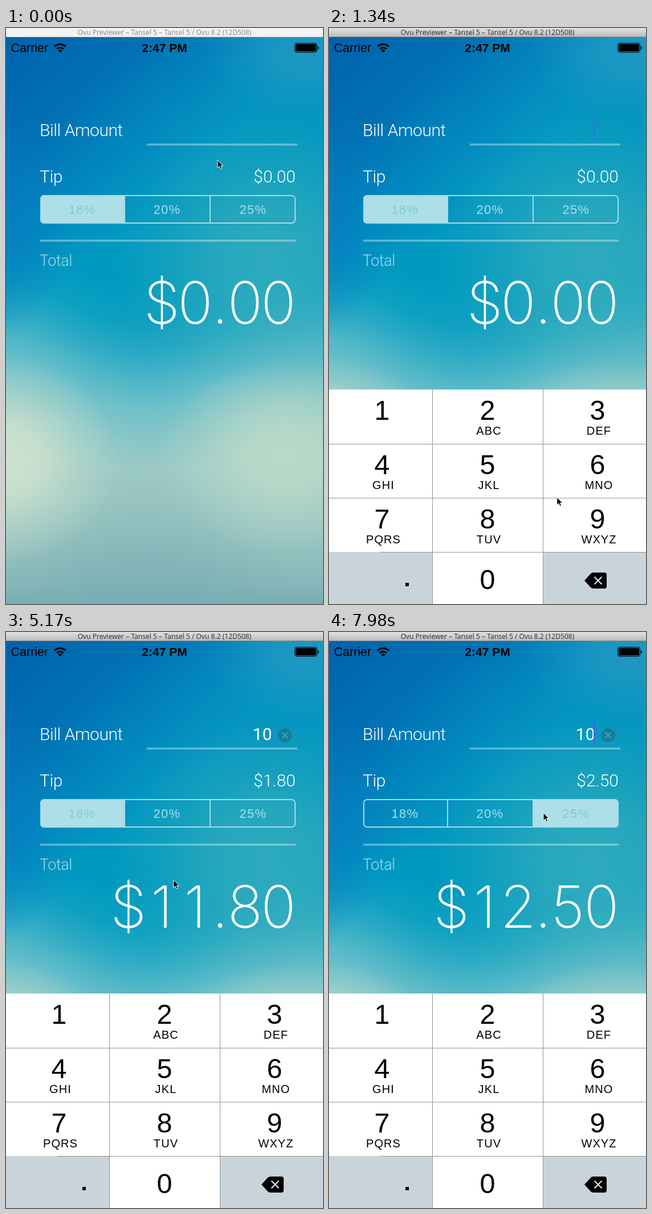
Recreate the animation shown at these times as an HTML page with a canvas. Size 556 by 1007 pixels, loop 8000 ms.

```html
<!DOCTYPE html>
<html lang="en">
<head>
<meta charset="utf-8">
<title>Tip calculator</title>
<style>
html, body { margin: 0; width: 100%; height: 100%; overflow: hidden; }
canvas, svg { position: absolute; left: 0; top: 0; width: 100vw; height: 100vh; }
text { fill: #fff; }
.bar text { font: 12.1px "Open Sans", sans-serif; text-anchor: middle; }
.status text { font: 21.5px "Liberation Sans", sans-serif; fill: #000; }
.status .clock { font-size: 21px; font-weight: 700; text-anchor: middle; }
.label { font: 300 30px Roboto, sans-serif; }
.name { letter-spacing: -.45px; }
.end { text-anchor: end; }
.total { font: 200 102px Inter, sans-serif; text-anchor: middle; }
.seg text { font: 22px "Liberation Sans", sans-serif; letter-spacing: 1.3px; text-anchor: middle; }
.pad text { fill: #000; text-anchor: middle; }
.num { font: 48.5px "Liberation Sans", sans-serif; }
.abc { font: 20px "Liberation Sans", sans-serif; letter-spacing: 1.1px; }
</style>
</head>
<body>
<canvas id="sky" width="556" height="1007"></canvas>
<svg viewBox="0 0 556 1007" preserveAspectRatio="none">
  <defs>
    <linearGradient id="active" x2="0" y2="1">
      <stop stop-color="#e2e2e2"/><stop offset="1" stop-color="#b9b9b9"/>
    </linearGradient>
    <clipPath id="round"><rect x="60" y="292" width="448" height="50" rx="7"/></clipPath>
  </defs>

  <g class="bar">
    <rect id="bar" width="556" height="16"/>
    <rect id="edge" y="15" width="556" height="1"/>
    <text id="title" x="278" y="11.5">Ovu Previewer – Tansel 5 – Tansel 5 / Ovu 8.2 (12D508)</text>
  </g>

  <g class="status">
    <text x="8.5" y="42">Carrier</text>
    <text class="clock" x="278" y="42">2:47 PM</text>
    <path d="M85 32.5a14.2 14.2 0 0 1 20 0M89 36.8a8.6 8.6 0 0 1 12 0" fill="none" stroke="#000" stroke-width="3"/>
    <path d="M91.4 39.3a5.2 5.2 0 0 1 7.2 0L95 43z"/>
    <rect x="506.5" y="26.5" width="39" height="16" rx="3" fill="none" stroke="#000"/>
    <rect x="508" y="28" width="36" height="13" rx="2"/>
    <path d="M547 32c2.5.5 2.5 5 0 5.5z"/>
  </g>

  <text class="label name" x="59" y="189">Bill Amount</text>
  <text class="label name" x="59" y="270">Tip</text>
  <text class="label name" x="59" y="416" style="font-size:27px" fill-opacity=".65">Total</text>
  <rect x="247" y="202" width="264" height="3.5" fill="#fff" opacity=".35"/>
  <rect x="60" y="370" width="448" height="3.5" fill="#fff" opacity=".35"/>
  <text class="label end" id="bill" x="466.5" y="188.5" style="font-weight:400"></text>
  <g id="clear">
    <circle cx="489.5" cy="180.5" r="12.5" fill="#147f9a"/>
    <path d="M484.5 175.5l10 10m0-10l-10 10" stroke="#3fa3bb" stroke-width="2"/>
  </g>
  <rect id="caret" x="464" y="158" width="3" height="38" fill="#4263f2"/>
  <text class="label end" id="tip" x="508" y="270"></text>
  <text class="total" id="total" y="517"></text>

  <g class="seg" id="seg">
    <rect id="fill" y="292" height="50" fill="#addfe9" clip-path="url(#round)"/>
    <rect x="61" y="293" width="446" height="48" rx="6" fill="none" stroke="#a6dce8" stroke-width="2"/>
    <path d="M208 292v50M358 292v50" stroke="#a6dce8" stroke-width="2"/>
  </g>

  <g class="pad" id="pad"></g>

  <path id="mouse" d="M0 0V13.5L3.2 10.7L5.3 15.5L7.7 14.5L5.6 9.8H9.8Z" fill="#000" stroke="#fff"/>
</svg>

<script>
const LOOP = 8000;
const $ = id => document.getElementById(id);
const add = (parent, tag, attrs, text = "") => {
  const el = document.createElementNS("http://www.w3.org/2000/svg", tag);
  for (const k in attrs) el.setAttribute(k, attrs[k]);
  el.textContent = text;
  return parent.appendChild(el);
};

// Vertical wash: y, colour, how far it sags in the middle
const wash = [[0, "#0894c0", 0], [420, "#009ac0", 30], [480, "#0ea0c2", 40], [530, "#2baac4", 42],
  [580, "#50b7c7", 42], [630, "#72c1c9", 40], [690, "#8ac7c8", 35], [760, "#9dcac6", 10],
  [830, "#9ac6c2", -25], [890, "#92c0be", -30], [950, "#86b6b9", -25], [1007, "#78adb5", 0]];

function paintSky() {
  const W = 556, H = 1007, g = $("sky").getContext("2d");
  for (let x = 0; x < W; x++) {
    const sag = Math.cos((x - 245) / W * 2 * Math.PI);
    const col = g.createLinearGradient(0, 0, 0, H);
    wash.forEach(([y, c, k]) => col.addColorStop((y + k * sag) / H, c));
    g.fillStyle = col;
    g.fillRect(x, 0, 1, H);
  }
  const glow = (x, y, rx, ry, rgb, alpha) => {
    g.save();
    g.translate(x, y);
    g.scale(rx, ry);
    const spot = g.createRadialGradient(0, 0, 0, 0, 0, 1);
    [1, 0.82, 0.35, 0].forEach((a, i) => spot.addColorStop(i / 3, `rgba(${rgb},${a * alpha})`));
    g.fillStyle = spot;
    g.fillRect(-1, -1, 2, 2);
    g.restore();
  };
  glow(460, 400, 270, 250, "51,172,188", 0.9);
  const corner = g.createLinearGradient(0, 0, 275, 306);
  corner.addColorStop(0, "rgba(0,96,172,1)");
  corner.addColorStop(0.45, "rgba(0,108,178,.85)");
  corner.addColorStop(0.72, "rgba(0,122,188,.55)");
  corner.addColorStop(1, "rgba(0,140,195,0)");
  g.fillStyle = corner;
  g.fillRect(0, 0, W, H);
  glow(0, 330, 110, 200, "10,125,195", 0.5);
  glow(530, 40, 180, 110, "32,152,194", 0.9);
  glow(-10, 755, 210, 180, "206,227,207", 1);
  glow(490, 750, 220, 170, "185,218,201", 1);
}
paintSky();

// Bursts of screen updates: start, end, count
const bursts = [[150, 450, 3], [740, 1780, 8], [1930, 2950, 8], [3100, 3680, 5],
  [3980, 5020, 8], [5170, 5760, 5], [6200, 6800, 5], [7100, 7690, 5]];
const ticks = [0, ...bursts.flatMap(([a, b, n]) =>
  Array.from({ length: n }, (_, i) => Math.round(a + (b - a) * i / (n - 1)))), 7980];

// Mouse path: time, x, y
const path = [[0, 371, 231], [150, 400, 218], [300, 440, 198], [450, 459, 188], [890, 459, 188],
  [1340, 399, 829], [1780, 330, 782], [2500, 113, 703], [2810, 113, 701], [2950, 137, 712],
  [3390, 272, 973], [3980, 272, 973], [5020, 290, 490], [5465, 301, 322], [5760, 301, 322],
  [6200, 360, 322], [6500, 425, 319], [7100, 425, 319], [7395, 433, 317], [7690, 433, 317],
  [7980, 376, 316]];

const FOCUS = 740, TYPE_1 = 2800, TYPE_0 = 3530, PICK_20 = 5600, PICK_25 = 7540;
const rates = [18, 20, 25];
const edges = [60, 207, 358, 508];

const labels = rates.map((r, i) =>
  add($("seg"), "text", { x: [133.5, 282.5, 433.5][i], y: 325 }, r + "%"));

// Keypad, drawn with its top at y = 0
const pad = $("pad");
const cols = [0, 181.5, 375.5, 556], rows = [0, 95, 190, 284.5, 375];
const keyFill = "#c8d4da";
const keys = [];
["", "ABC", "DEF", "GHI", "JKL", "MNO", "PQRS", "TUV", "WXYZ", ".", "", "del"].forEach((sub, i) => {
  const c = i % 3, r = i / 3 | 0, special = sub === "." || sub === "del";
  const mid = [93, 278, 471][c];
  keys.push(add(pad, "rect", { x: cols[c], y: rows[r], width: cols[c + 1] - cols[c],
    height: rows[r + 1] - rows[r], fill: special ? keyFill : "#fff" }));
  if (special) return;
  add(pad, "text", { class: "num", x: mid, y: rows[r] + (r === 3 ? 64.5 : 53) }, i === 10 ? 0 : i + 1);
  add(pad, "text", { class: "abc", x: mid + 2.5, y: rows[r] + 79 }, sub);
});
add(pad, "path", { d: "M0 95.5H556M0 190H556M90 284.500H556M181.5 0V375M375.5 0V375",
  stroke: "#8f9497", fill: "none" });
add(pad, "rect", { x: 134, y: 338, width: 6, height: 6 });
add(pad, "path", { d: "M448 334L459 322Q461 320 464 320H483Q487 320 487 324V344Q487 348 483 348H464Q461 348 459 346Z" });
add(pad, "path", { d: "M465.5 327.5l13 13m0-13l-13 13", stroke: "#dfe6e9", "stroke-width": 2.2 });

function mouseAt(t) {
  const n = path.findIndex(p => p[0] > t);
  if (n < 0) return path[path.length - 1].slice(1);
  const [t0, x0, y0] = path[n - 1], [t1, x1, y1] = path[n];
  const k = (t - t0) / (t1 - t0);
  return [x0 + (x1 - x0) * k, y0 + (y1 - y0) * k];
}

function caretAlpha(t) {
  if (t < FOCUS) return 0;
  const start = t >= TYPE_0 ? TYPE_0 : t >= TYPE_1 ? TYPE_1 : FOCUS;
  const p = (t - start) % 1000;
  if (p < 500) return 1;
  return Math.max(0, 1 - (p - 500) / 190, (p - 850) / 150);
}

function setTotal(str) {
  let right = 508;
  const xs = [...str].reverse().map(ch => {
    const w = ch === "." ? 29 : 58.5;
    right -= w;
    return right + w / 2 - 1;
  });
  $("total").setAttribute("x", xs.reverse().join(" "));
  $("total").textContent = str;
}

function draw(now) {
  const time = now % LOOP;
  const t = ticks.filter(k => k <= time).pop();

  const active = t >= 150;
  $("bar").setAttribute("fill", active ? "url(#active)" : "#f3f3f3");
  $("edge").setAttribute("fill", active ? "#8a8a8a" : "#d0d0d0");
  $("title").style.fill = active ? "#2c2c2c" : "#858585";

  const bill = t >= TYPE_0 ? 10 : t >= TYPE_1 ? 1 : 0;
  const pick = t >= PICK_25 ? 2 : t >= PICK_20 ? 1 : 0;
  const tip = bill * rates[pick] / 100;
  $("bill").textContent = bill || "";
  $("clear").style.display = bill ? "" : "none";
  $("caret").style.opacity = caretAlpha(t);
  $("tip").textContent = "$" + tip.toFixed(2);
  setTotal("$" + (bill + tip).toFixed(2));

  $("fill").setAttribute("x", edges[pick]);
  $("fill").setAttribute("width", edges[pick + 1] - edges[pick]);
  labels.forEach((el, i) => el.style.fill = i === pick ? "#7dcbd8" : "#a9dfe9");

  const rise = Math.min(1, Math.max(0, (t - 660) / 400));
  pad.setAttribute("transform", `translate(0 ${632 + 375 * (1 - rise) ** 2.62})`);
  keys[0].setAttribute("fill", t >= 2650 && t < 2950 ? keyFill : "#fff");
  keys[10].setAttribute("fill", t >= 3385 && t < 3680 ? keyFill : "#fff");

  $("mouse").setAttribute("transform", `translate(${mouseAt(t)})`);
}

const begin = performance.now();
function loop() {
  draw(performance.now() - begin);
  requestAnimationFrame(loop);
}
loop();
</script>
</body>
</html>
```
